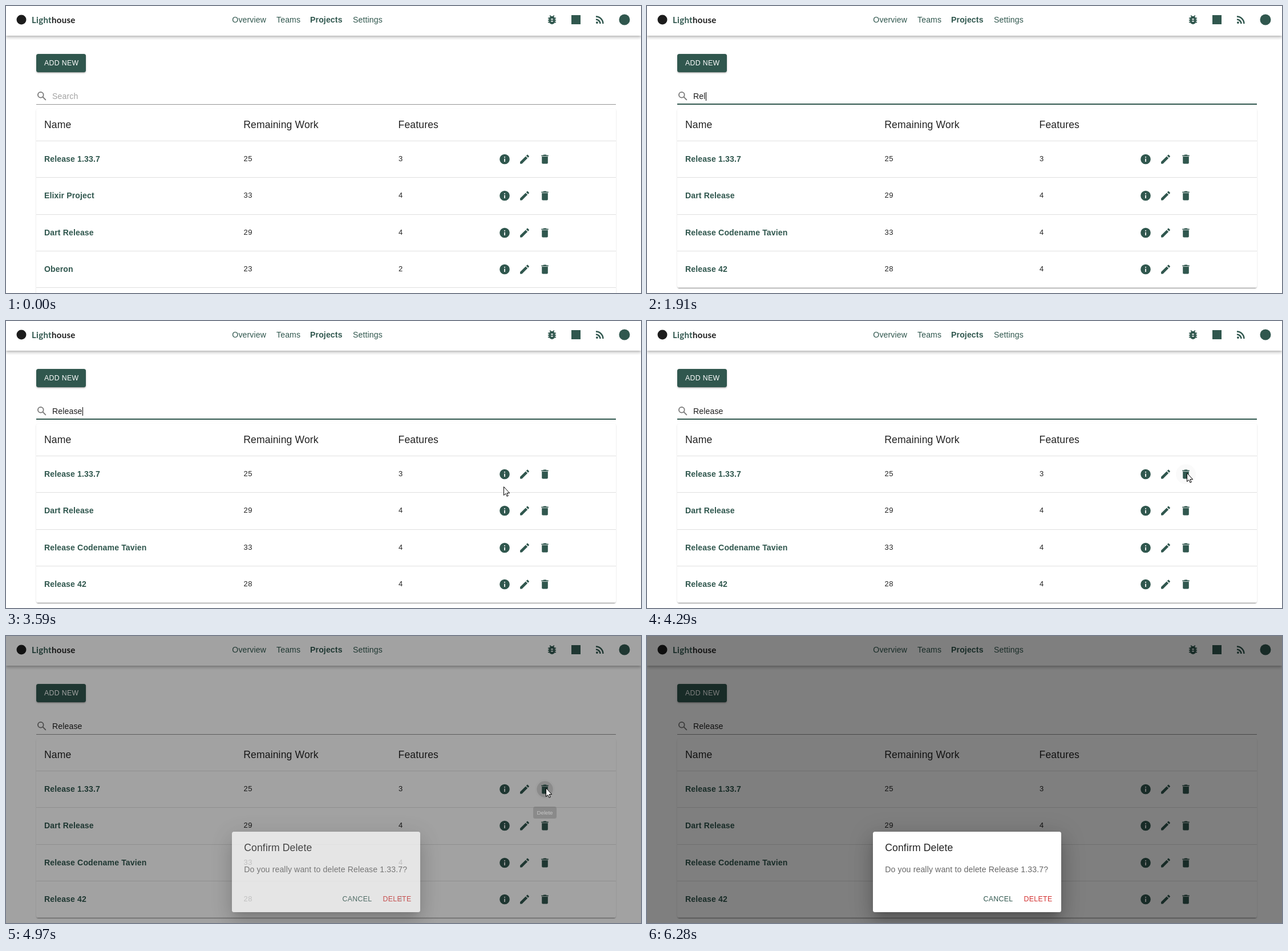
An HTML page for the animation above (6960 ms loop, 1113 px wide and 503 px high).

```html
<!DOCTYPE html>
<html lang="en">
<head>
<meta charset="utf-8">
<title>Projects</title>
<style>
  html, body { margin: 0; width: 100%; height: 100%; overflow: hidden; background: #fff; }
  #stage { position: absolute; left: 0; top: 0; width: 1113px; height: 503px; overflow: hidden;
    font: 14.08px/20px "Liberation Sans", Arial, sans-serif; color: rgba(0,0,0,.87); }
  #stage div, #stage span, #stage svg { position: absolute; }
  #stage span { white-space: pre; letter-spacing: .00938em; }
  #stage span b { font-weight: inherit; color: #1c1c1c; }
  #stage .brand { font: 700 15px/20px Lato, sans-serif; letter-spacing: .3px; color: #30574e; }
  #stage .nav { color: #30574e; }
  #stage .name { color: #30574e; font-weight: 700; }
  #stage .head { font-size: 17.6px; letter-spacing: .0075em; }
  #stage .num { font-size: 13px; letter-spacing: .5px; }
  #stage .btn { font-size: 12.32px; letter-spacing: .02857em; }
  #stage .muted { color: rgba(0,0,0,.6); }
  #header { left: 0; top: 0; width: 1113px; height: 52px;
    box-shadow: 0 1.8px 3.5px -.9px rgba(0,0,0,.2), 0 3.5px 4.4px rgba(0,0,0,.14), 0 .9px 8.8px rgba(0,0,0,.12); }
  #add { left: 53px; top: 84px; width: 87px; height: 32px; border-radius: 3.5px; background: #30574e;
    box-shadow: 0 2.6px 1px -1.8px rgba(0,0,0,.2), 0 1.8px 1.8px rgba(0,0,0,.14), 0 .9px 4.4px rgba(0,0,0,.12); }
  #paper { left: 53px; top: 180px; width: 1016px; height: 314px; border-radius: 3.5px;
    box-shadow: 0 1.8px .9px -.9px rgba(0,0,0,.2), 0 .9px .9px rgba(0,0,0,.14), 0 .9px 2.6px rgba(0,0,0,.12); }
  .rule { left: 53px; width: 1016px; height: 1px; background: #e0e0e0; }
  #line { left: 53px; top: 172px; width: 1016px; height: 1px; }
  #focusLine { left: 53px; top: 171px; width: 1016px; height: 2px; background: #30574e; }
  #caret { display: inline-block; width: 1px; height: 15px; margin-right: -1px; vertical-align: -3px; background: #000; }
  #placeholder { opacity: .42; }
  #backdrop { inset: 0; background: rgba(0,0,0,.5); }
  #dialog { left: 396px; top: 343px; width: 330px; height: 141px; border-radius: 3.5px; background: #fff;
    box-shadow: 0 9.7px 13px -6px rgba(0,0,0,.2), 0 21px 33px 2.6px rgba(0,0,0,.14), 0 8px 40px 7px rgba(0,0,0,.12); }
  #tip { top: 299px; height: 21px; padding: 0 7px; border-radius: 3.5px; transform: translateX(-50%);
    background: rgba(97,97,97,.92); color: #fff; font-size: 9.68px; line-height: 21px; }
  svg { left: 0; top: 0; overflow: visible; }
</style>
</head>
<body>
<div id="stage"></div>
<script>
const LOOP = 6960;
const GREEN = '#30574e';
const ROW_TOP = 236, ROW_STEP = 64.3;
const rowY = i => 268 + Math.round(i * ROW_STEP);

// A line of text, placed by its left edge and vertical centre.
const text = (x, y, cls, s, attrs = '') =>
  `<span class="${cls}" style="left:${x}px;top:${y - 10}px" ${attrs}>${s}</span>`;

// A 24-unit icon centred on a point.
const icon = (x, y, body, color = GREEN) =>
  `<g transform="translate(${x} ${y}) scale(.88) translate(-12 -12)" fill="${color}">${body}</g>`;

const path = d => `<path d="${d}"/>`;
const ICONS = {
  info: path('M12 2a10 10 0 1 0 0 20a10 10 0 1 0 0-20m1 15h-2v-6h2zm0-8h-2V7h2z'),
  edit: path('M3 17.25V21h3.75L17.81 9.94l-3.75-3.75zM20.71 7.04a1 1 0 0 0 0-1.41l-2.34-2.34a1 1 0 0 0-1.41 0l-1.83 1.83 3.75 3.75z'),
  trash: path('M6 19c0 1.1.9 2 2 2h8c1.1 0 2-.9 2-2V7H6zM19 4h-3.5l-1-1h-5l-1 1H5v2h14z'),
  search: '<g fill="none" stroke="#757575" stroke-width="2"><circle cx="9.5" cy="9.5" r="5.5"/><path d="M13.7 13.7l6 6"/></g>',
  bug: `<rect x="6" y="5" width="12" height="16" rx="6"/>
    <path d="M4 9h16M4 13h16M4 17h16M7.7 3.7l3 3M16.3 3.7l-3 3" stroke="${GREEN}" stroke-width="2"/>
    <path d="M10 11h4M10 15h4" stroke="#fff" stroke-width="2"/>`,
  feed: `<circle cx="6.2" cy="17.8" r="2.2"/>
    <path d="M4 5.85A14.15 14.15 0 0 1 18.15 20M4 11.5A8.5 8.5 0 0 1 12.5 20" fill="none" stroke="${GREEN}" stroke-width="2.83"/>`
};

const allRows = [['Release 1.33.7', 25, 3], ['Elixir Project', 33, 4], ['Dart Release', 29, 4], ['Oberon', 23, 2]];
const foundRows = [allRows[0], allRows[2], ['Release Codename Tavien', 33, 4], ['Release 42', 28, 4]];

const table = (id, rows) => `<div id="${id}">` + rows.map(([name, work, features], i) =>
  text(66.9, rowY(i), 'name', name) + text(416.5, rowY(i), 'num', work) + text(688, rowY(i), 'num', features)
).join('') + '</div>';

const rules = [0, 1, 2, 3, 4].map(i =>
  `<div class="rule" style="top:${Math.round(ROW_TOP + i * ROW_STEP)}px"></div>`).join('');
const rowIcons = allRows.map((_, i) =>
  icon(874, rowY(i) + .5, ICONS.info) + icon(909, rowY(i) + .5, ICONS.edit) + icon(944.5, rowY(i) + .5, ICONS.trash)
).join('');

document.getElementById('stage').innerHTML = `
  <div id="header"></div><div id="add"></div><div id="paper"></div>${rules}
  ${text(45, 24, 'brand', 'Light<b>house</b>')}
  ${text(396.3, 24, 'nav', 'Overview')}${text(474, 24, 'nav', 'Teams')}
  ${text(533, 24, 'name', 'Projects')}${text(608, 24, 'nav', 'Settings')}
  ${text(66.9, 100, 'btn', 'ADD NEW', 'id="addLabel"')}
  ${text(81, 158, '', 'Search', 'id="placeholder"')}
  ${text(81, 158, '', '<b id="typed"></b><i id="caret"></i>')}
  <div id="line"></div><div id="focusLine"></div>
  ${text(66.9, 208, 'head', 'Name')}${text(416.2, 208, 'head', 'Remaining Work')}${text(687.5, 208, 'head', 'Features')}
  ${table('all', allRows)}${table('found', foundRows)}
  <svg width="1113" height="503">
    <circle id="hover" cy="268.5" r="17.6"/>
    <circle id="ripple" cx="944.5" cy="268.5" fill-opacity=".12"/>
    <circle cx="27" cy="24" r="8.5" fill="#1c1c1c"/>
    ${icon(957, 24, ICONS.bug)}
    <rect x="991" y="16" width="16" height="16" fill="${GREEN}"/>
    ${icon(1041, 24, ICONS.feed)}
    <circle cx="1084" cy="24" r="9.5" fill="${GREEN}"/>
    ${icon(63, 158, ICONS.search)}${rowIcons}
  </svg>
  <div id="backdrop"></div>
  <div id="dialog">
    ${text(21.2, 28, 'head', 'Confirm Delete')}
    ${text(21.2, 66, 'muted', 'Do you really want to delete Release 1.33.7?')}
    ${text(193.5, 118, 'btn nav', 'CANCEL')}
    ${text(264.5, 118, 'btn', 'DELETE', 'id="confirm"')}
  </div>
  <div id="tip"></div>
  <svg id="mouse" width="1" height="1">
    <path id="arrow" d="M.5.5V15.5L3.8 12.4 6 17.3 8.2 16.3 6 11.5H10.6Z" fill="#fff" stroke="#000"/>
    <path id="beam" d="M-3-7.5H-1L0-6.5 1-7.5H3M0-6.5V6.5M-3 7.5H-1L0 6.5 1 7.5H3" fill="none" stroke="#000"/>
  </svg>`;

const el = {};
document.querySelectorAll('[id]').forEach(node => el[node.id] = node);
el.addLabel.style.color = '#fff';
el.confirm.style.color = '#d32f2f';

const clamp = v => Math.min(1, Math.max(0, v));
const ramp = (t, start, duration) => clamp((t - start) / duration);
const show = (node, on) => node.style.visibility = on ? 'visible' : 'hidden';

// CSS-style cubic-bezier, solved by bisection.
function bezier(x1, y1, x2, y2) {
  const at = (a, b, s) => 3 * a * s * (1 - s) ** 2 + 3 * b * s * s * (1 - s) + s ** 3;
  return p => {
    let low = 0, high = 1;
    for (let i = 0; i < 20; i++) {
      const mid = (low + high) / 2;
      if (at(x1, x2, mid) < p) low = mid; else high = mid;
    }
    return at(y1, y2, high);
  };
}
const standard = bezier(.4, 0, .2, 1);
const easeOut = bezier(0, 0, .2, 1);

const WORD = 'Release';
const KEY_TIMES = [1510, 1710, 1910, 1980, 2050, 2180, 2250];
const FOCUS = 1050, BLUR = 4670, OPEN = 4866;

// [time, x, y] of the pointer
const POINTER = [
  [120, 340, 510], [190, 330, 480], [470, 262, 240], [680, 232, 130], [820, 229, 152], [1310, 226, 158],
  [3100, 226, 158], [3310, 540, 215], [3450, 790, 280], [3590, 871.5, 290], [3730, 906, 263],
  [3800, 901, 262], [3870, 910, 266], [4080, 910, 266], [4290, 946, 266],
  [5720, 946, 266], [5930, 893, 330], [6070, 920, 400], [6210, 1025, 480], [6280, 1031, 510]
];

function pointerAt(t) {
  const i = POINTER.findIndex(key => key[0] > t);
  if (i < 1) return POINTER[0].slice(1);
  const [t0, x0, y0] = POINTER[i - 1], [t1, x1, y1] = POINTER[i];
  const p = (t - t0) / (t1 - t0);
  return [x0 + (x1 - x0) * p, y0 + (y1 - y0) * p];
}

function drawPointer(t) {
  const visible = t >= 190 && t < 1510 || t >= 3170 && t < 6280;
  const [x, y] = pointerAt(t);
  const overInput = y > 143 && y < 173;
  el.mouse.style.transform = `translate(${Math.round(x)}px,${Math.round(y)}px)`;
  show(el.arrow, visible && !overInput);
  show(el.beam, visible && overInput);
  return visible && overInput;
}

function drawSearch(t, hovered) {
  const count = KEY_TIMES.filter(k => k <= t).length;
  const blinkStart = count ? KEY_TIMES[count - 1] - 70 : FOCUS;
  const focused = t >= FOCUS && t < BLUR;
  el.typed.textContent = WORD.slice(0, count);
  show(el.placeholder, !count);
  show(el.caret, focused && Math.floor((t - blinkStart) / 530) % 2 === 0);
  el.line.style.background = `rgba(0,0,0,${hovered ? .87 : .42})`;
  const width = easeOut(ramp(t, FOCUS, 200)) - easeOut(ramp(t, BLUR, 245));
  el.focusLine.style.transform = `scaleX(${width})`;
  show(el.all, count < 2);
  show(el.found, count >= 2);
  el.paper.style.height = count < 2 ? '380px' : '314px';
}

function drawButtons(t) {
  const onTrash = t >= 4220;
  const hover = onTrash ? ramp(t, 4220, 150) - ramp(t, 4900, 150) : ramp(t, 3990, 150);
  el.hover.setAttribute('cx', onTrash ? 944.5 : 909);
  el.hover.setAttribute('fill-opacity', .04 * hover);
  el.ripple.setAttribute('r', t < 4760 || t >= 5100 ? 0 : 15 * easeOut(ramp(t, 4760, 300)));

  const fade = onTrash ? ramp(t, 4320, 120) - ramp(t, 4885, 140) : ramp(t, 3990, 100) - ramp(t, 4150, 70);
  el.tip.textContent = onTrash ? 'Delete' : 'Edit';
  el.tip.style.left = (onTrash ? 944.5 : 909) + 'px';
  el.tip.style.opacity = fade;
}

function frame() {
  const t = performance.now() % LOOP;
  drawSearch(t, drawPointer(t));
  drawButtons(t);
  el.backdrop.style.opacity = el.dialog.style.opacity = standard(ramp(t, OPEN, 225));
  requestAnimationFrame(frame);
}
frame();
</script>
</body>
</html>
```
